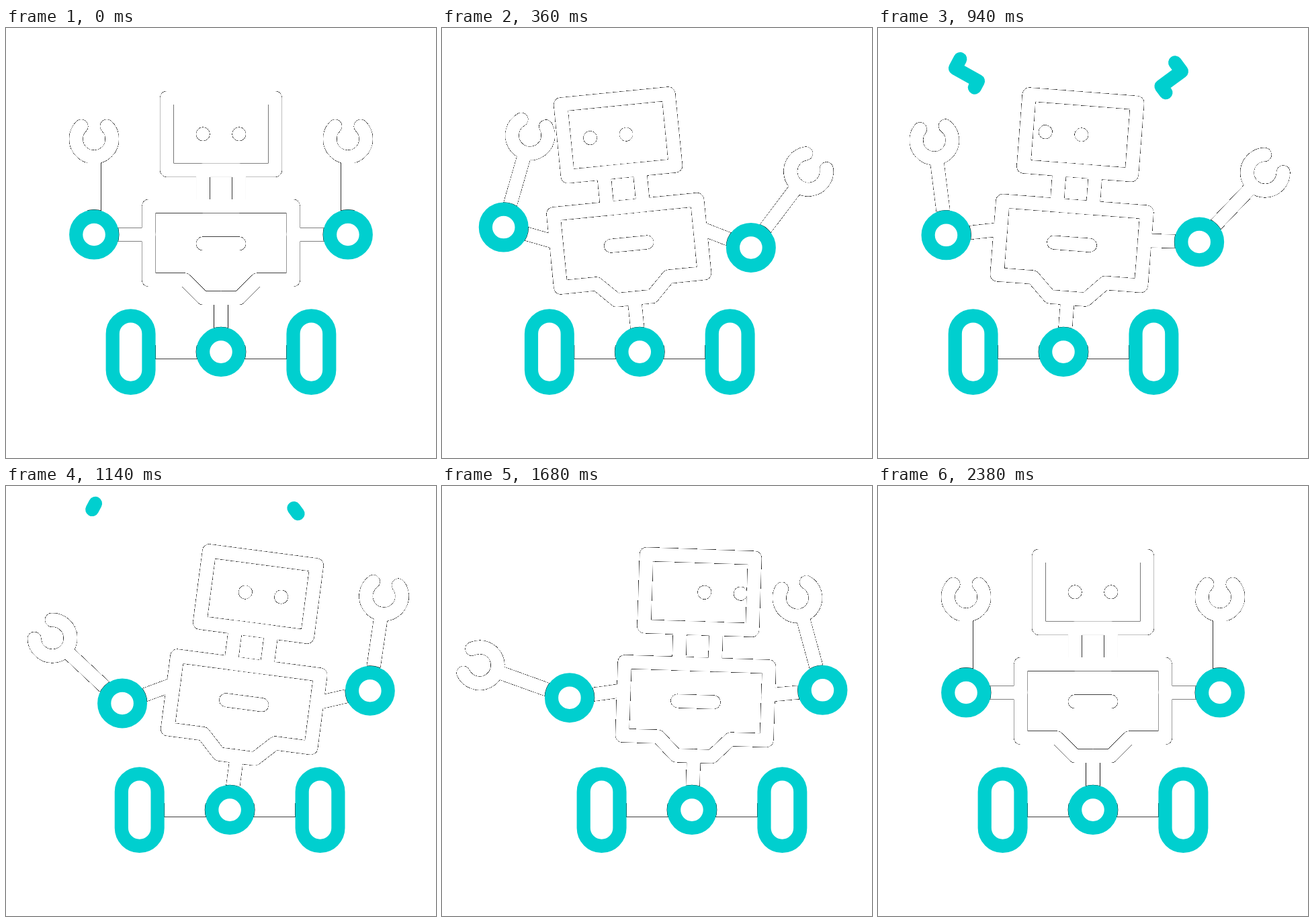
Write an HTML page with a canvas that moves like this. It is 640 by 640 pixels and loops after 2.4 s.

```html
<!DOCTYPE html>
<html lang="en">
<head>
<meta charset="utf-8">
<title>Dancing robot</title>
<style>
  html, body { margin: 0; width: 100%; height: 100%; overflow: hidden; background: #fff; }
  canvas { display: block; }
</style>
</head>
<body>
<canvas id="stage" width="640" height="640"></canvas>
<script>
const SIZE = 640, MID = SIZE / 2, LOOP = 2400, TEAL = '#00cfcf';
const U = 6.72, STROKE = 20.2, RING = 4 * U;
const HUB_Y = 482.1, ARM_Y = 307.5;
const SIDES = [-1, 1];

const stage = document.getElementById('stage').getContext('2d');
const layer = Object.assign(document.createElement('canvas'), { width: SIZE, height: SIZE });
const robot = layer.getContext('2d', { willReadFrequently: true });

const rad = degrees => degrees * Math.PI / 180;

function ease(t, start, span) {
  const p = Math.min(1, Math.max(0, (t - start) / span));
  return p * p * (3 - 2 * p);
}

// Moves from rest to `first`, across to `second`, then back to rest.
function sway(t, first, second, { start, turn, back, span }) {
  return first * ease(t, start, span)
    + (second - first) * ease(t, turn, span)
    - second * ease(t, back, span);
}

const ROLL = { start: 92, turn: 793, back: 1522, span: 610 };
const LOOK = { ...ROLL, back: 1604 };
const TILT = { start: 0, turn: 564, back: 1329, span: 530 };
const ARM_LAG = 35;

function poseAt(t) {
  return {
    x: MID + sway(t, -62.5, 62.5, ROLL),
    eyes: sway(t, -36, 36, LOOK),
    lean: sway(t, -7.5, 7.5, TILT),
    leftArm: sway(t - ARM_LAG, 32.5, -28, TILT),
    rightArm: sway(t - ARM_LAG, 40, -20.5, TILT),
    leftWrist: 63 * (ease(t, 1640, 600) - ease(t, 900, 540)),
    rightWrist: 43 * ease(t, 80, 680) - 53 * ease(t, 900, 550) + 10 * ease(t, 1680, 600),
    sparkHead: ease(t, 655, 400),
    sparkTail: ease(t, 814, 400)
  };
}

function pen(ctx, color, width = STROKE) {
  ctx.strokeStyle = ctx.fillStyle = color;
  ctx.lineWidth = width;
  ctx.lineCap = ctx.lineJoin = 'round';
}

function poly(ctx, points, closed) {
  ctx.beginPath();
  points.forEach(([x, y]) => ctx.lineTo(x, y));
  if (closed) ctx.closePath();
  ctx.stroke();
}

// A closed outline mirrored about the vertical axis, from its right half.
function mirrored(half) {
  const left = half.map(([x, y]) => [-x, y]).reverse();
  poly(robot, [...half, ...left], true);
}

function circle(ctx, x, y, r) {
  ctx.beginPath();
  ctx.arc(x, y, r, 0, 2 * Math.PI);
}

function capsule(ctx, x) {
  ctx.beginPath();
  ctx.roundRect(x - RING, HUB_Y - 2 * RING, 2 * RING, 4 * RING, RING);
}

// Draws one arm and returns the elbow position on the stage.
function arm(side, turn, wrist) {
  const reach = 81.4, claw = -142.3;
  robot.save();
  robot.translate(side * 16 * U, ARM_Y);
  robot.rotate(rad(turn));
  poly(robot, [[0, 0], [side * (reach - RING), 0]]);
  robot.translate(side * reach, 0);
  const { e, f } = robot.getTransform();
  robot.rotate(rad(wrist));
  poly(robot, [[0, -RING], [0, claw + RING]]);
  robot.beginPath();
  robot.arc(0, claw, RING, rad(-45), rad(225));
  robot.stroke();
  robot.restore();
  return [e, f];
}

function drawBody(eyes) {
  const headTop = 104, headBottom = 211.55, chest = 265.1, waist = 374.9, base = waist + RING;
  mirrored([[12 * U, headTop], [12 * U, headBottom]]);
  mirrored([[4 * U, headBottom], [4 * U, chest]]);
  mirrored([[16 * U, chest], [16 * U, waist], [8 * U, waist], [4 * U, base]]);
  poly(robot, [[0, base], [0, HUB_Y - RING]]);
  poly(robot, [[-4 * U, 320.8], [4 * U, 320.8]]);
  for (const side of SIDES) {
    circle(robot, side * 4 * U + eyes, 157.8, STROKE / 2);
    robot.fill();
  }
}

function drawRobot(pose) {
  robot.clearRect(0, 0, SIZE, SIZE);
  pen(robot, '#fff');
  for (const side of SIDES) {
    poly(robot, [[pose.x + side * RING, HUB_Y], [pose.x + side * 16 * U, HUB_Y]]);
  }
  robot.save();
  robot.translate(pose.x, HUB_Y);
  robot.rotate(rad(pose.lean));
  robot.translate(0, -HUB_Y);
  drawBody(pose.eyes);
  const joints = [
    arm(-1, pose.leftArm, pose.leftWrist),
    arm(1, pose.rightArm, pose.rightWrist),
    [pose.x, HUB_Y]
  ];
  robot.restore();
  return joints;
}

// Partly covered pixels become the thin, broken dark outline.
function darkenEdges() {
  const image = robot.getImageData(0, 0, SIZE, SIZE), d = image.data;
  for (let i = 0; i < d.length; i += 4) {
    const alpha = d[i + 3];
    if (alpha === 0 || alpha === 255) continue;
    d[i] = d[i + 1] = d[i + 2] = alpha;
    d[i + 3] = alpha < 20 ? 0 : 255;
  }
  robot.putImageData(image, 0, 0);
}

// Dark seams where white limbs meet the teal parts.
function drawSeams(joints, wheels) {
  robot.globalCompositeOperation = 'source-atop';
  pen(robot, '#000', STROKE + 0.8);
  joints.forEach(([x, y]) => { circle(robot, x, y, RING); robot.stroke(); });
  wheels.forEach(x => { capsule(robot, x); robot.stroke(); });
  robot.globalCompositeOperation = 'source-over';
}

function drawTeal(joints, wheels) {
  const paint = () => { stage.fill(); stage.stroke(); };
  pen(stage, TEAL, STROKE);
  stage.fillStyle = '#fff';
  joints.forEach(([x, y]) => { circle(stage, x, y, RING); paint(); });
  wheels.forEach(x => { capsule(stage, x); paint(); });
}

// A zigzag: a slanted bar with a hook at each end, drawn between two fractions.
function drawSpark([cx, cy], [bx, by], [hx, hy], tail, head) {
  const hook = Math.hypot(hx, hy), length = 2 * (hook + Math.hypot(bx, by));
  pen(stage, TEAL, STROKE);
  stage.setLineDash([(head - tail) * length, 2 * length]);
  stage.lineDashOffset = -tail * length;
  poly(stage, [
    [cx - bx - hx, cy - by - hy], [cx - bx, cy - by],
    [cx + bx, cy + by], [cx + bx + hx, cy + by + hy]
  ]);
  stage.setLineDash([]);
}

function render(t) {
  const pose = poseAt(t);
  const wheels = SIDES.map(side => pose.x + side * 20 * U);
  const joints = drawRobot(pose);
  darkenEdges();
  drawSeams(joints, wheels);
  stage.fillStyle = '#fff';
  stage.fillRect(0, 0, SIZE, SIZE);
  stage.drawImage(layer, 0, 0);
  drawTeal(joints, wheels);
  const { sparkTail, sparkHead } = pose;
  if (sparkHead - sparkTail > 0.001) {
    drawSpark([132, 69.5], [-17, -9.5], [18, -34], sparkTail, sparkHead);
    drawSpark([436.7, 75.7], [15.2, -11.2], [-23.5, -31.5], sparkTail, sparkHead);
  }
}

const began = performance.now();
function tick() {
  render((performance.now() - began) % LOOP);
  requestAnimationFrame(tick);
}
tick();
</script>
</body>
</html>
```
